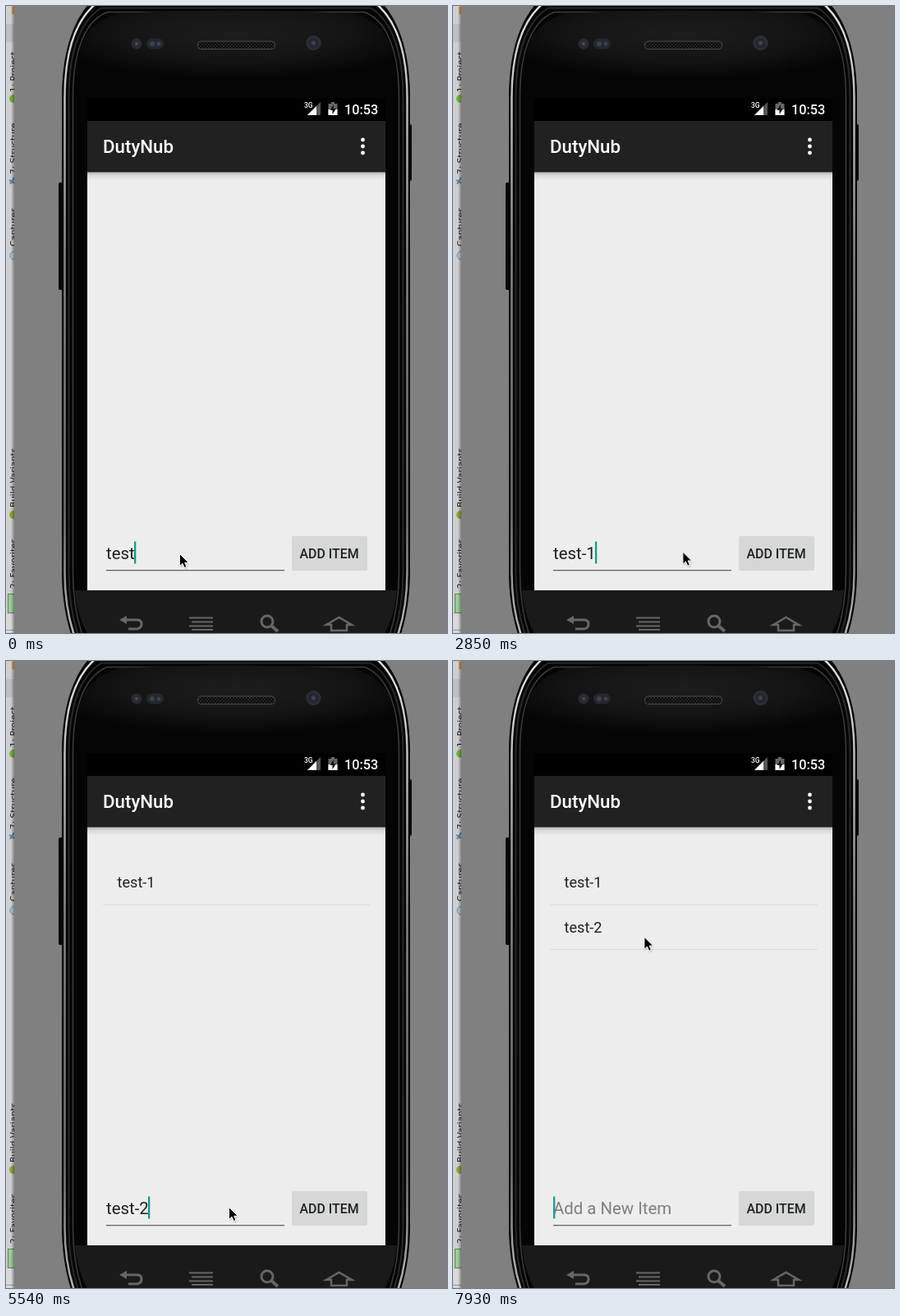
Animation of 537x764 px, one loop 8000 ms. Source, as an HTML page:

```html
<!DOCTYPE html>
<html lang="en">
<head>
<meta charset="utf-8">
<title>Todo list demo</title>
<style>
  html, body { margin: 0; width: 100%; height: 100%; overflow: hidden; background: #808080; }
  svg { display: block; width: 537px; height: 764px; font-family: Roboto, sans-serif; }
  .medium { font-weight: 500; }
  .panel { font: 10.5px "DejaVu Sans", sans-serif; fill: #222; }
</style>
</head>
<body>
<svg viewBox="0 0 537 764">
  <defs>
    <linearGradient id="rim" x1="0" y1="0" x2="0" y2="1">
      <stop offset="0" stop-color="#e2e4e2"/><stop offset=".12" stop-color="#c4c6c4"/>
      <stop offset=".4" stop-color="#858785"/><stop offset=".8" stop-color="#6f716f"/>
      <stop offset="1" stop-color="#b4b6b4"/>
    </linearGradient>
    <radialGradient id="gloss" cx=".5" cy=".3" r=".6">
      <stop offset="0" stop-color="#1d1d1d"/><stop offset=".6" stop-color="#141414"/><stop offset="1" stop-color="#050505"/>
    </radialGradient>
    <linearGradient id="barShadow" x1="0" y1="0" x2="0" y2="1">
      <stop offset="0" stop-opacity=".25"/><stop offset=".4" stop-opacity=".08"/><stop offset="1" stop-opacity="0"/>
    </linearGradient>
    <linearGradient id="edge"><stop offset="0" stop-opacity="0"/><stop offset="1" stop-opacity=".35"/></linearGradient>
    <radialGradient id="lens"><stop offset="0" stop-color="#4b5264"/><stop offset=".45" stop-color="#20232c"/><stop offset="1" stop-color="#30333c"/></radialGradient>
    <pattern id="mesh" width="4" height="4" patternUnits="userSpaceOnUse">
      <rect width="4" height="4" fill="#0a0a0a"/><circle cx="1" cy="1" r=".8" fill="#444"/><circle cx="3" cy="3" r=".8" fill="#444"/>
    </pattern>
    <clipPath id="sideClip"><rect width="10" height="764"/></clipPath>
    <clipPath id="buttonClip"><rect x="348" y="646" width="92" height="42" rx="2"/></clipPath>
    <filter id="soft" x="-20%" y="-20%" width="140%" height="150%"><feGaussianBlur stdDeviation="1.3"/></filter>
  </defs>

  <rect width="537" height="764" fill="#808080"/>

  <!-- Tool window strip -->
  <g clip-path="url(#sideClip)">
    <rect width="10" height="764" fill="#cfcfcf"/>
    <rect y="22" width="10" height="22" fill="#c0c0c0"/>
    <rect x="7" y="1" width="3" height="9" fill="#d99a4e"/>
    <g class="panel">
      <text transform="translate(13 105) rotate(-90)">1: Project</text>
      <text transform="translate(13 205) rotate(-90)">7: Structure</text>
      <text transform="translate(13 293) rotate(-90)">Captures</text>
      <text transform="translate(13 611) rotate(-90)">Build Variants</text>
      <text transform="translate(13 710) rotate(-90)">2: Favorites</text>
    </g>
    <circle cx="9" cy="113" r="5" fill="#70b53c"/>
    <path d="M4 212l6 4M5 217l5-8" stroke="#5685ad" stroke-width="2"/>
    <circle cx="10" cy="304" r="5" fill="#b5cad8" stroke="#678ba5"/>
    <circle cx="9" cy="620" r="5" fill="#87aa37"/>
    <rect x="2.500" y="716.500" width="12" height="23" fill="#9ccb98" stroke="#687d66"/>
    <rect y="741" width="10" height="23" fill="#d8d8d8"/>
    <path d="M0 760.500H10" stroke="#999"/>
    <rect x="6" width="4" height="764" fill="url(#edge)"/>
  </g>

  <!-- Phone -->
  <rect x="64" y="215" width="7" height="131" rx="2" fill="#080808"/>
  <rect x="489" y="144" width="5" height="69" rx="2" fill="#080808"/>
  <path id="body" fill="#050505"/>
  <g fill="none">
    <path id="rimLine" stroke="url(#rim)" stroke-width="2.500"/>
    <path id="grooveLine" stroke="#292929" stroke-width="2"/>
    <path id="bezelLine" stroke="#3c3c3c" stroke-width="1.500"/>
  </g>
  <path d="M84 83C87 42 102 20 136 9Q280 2 424 9C458 20 473 42 476 83Q390 97 280 98Q170 97 84 83Z" fill="url(#gloss)"/>
  <path d="M84 712H476C474 736 467 755 457 772H103C93 755 86 736 84 712Z" fill="#1a1a1a"/>
  <rect x="233.500" y="43" width="94" height="9.500" rx="4" fill="url(#mesh)" stroke="#4a4a4a"/>
  <circle cx="374.500" cy="45" r="9" fill="url(#lens)"/>
  <circle cx="159" cy="46" r="6.500" fill="#292b32"/><circle cx="159" cy="46" r="2" fill="#454955"/>
  <rect x="171" y="39.500" width="21" height="13" rx="6.500" fill="#25272e"/>
  <circle cx="178" cy="46" r="3" fill="#3c404e"/><circle cx="186" cy="46" r="2.500" fill="#3c404e"/>

  <g fill="none" stroke="#666" stroke-width="3">
    <path d="M144 748H160Q165 748 165 753T160 759H149"/>
    <path d="M138 748L147 743V753Z" fill="#666" stroke="none"/>
    <path d="M223 745.500H252M226 750.500H252M223 755.500H252M226 760H252" stroke-width="2"/>
    <circle cx="318" cy="750" r="7"/><path d="M323 755L331 762" stroke-width="4"/>
    <path d="M390 754L405.500 745L421 754H415V761H396V754Z" stroke-width="2.500"/>
  </g>

  <!-- Screen -->
  <rect x="99" y="112" width="363" height="600"/>
  <g fill="#fff">
    <text class="medium" x="363" y="124" font-size="8.500">3G</text>
    <path d="M383 117V133H367Z" fill="#555"/><path d="M378 122V133H367Z"/>
    <path d="M396 117H400V119H403.500V133H392.500V119H396Z" fill="#666"/>
    <path d="M392.500 126H403.500V133H392.500Z"/>
    <path d="M399 120L394.500 127H397.500V132L402 125H399Z" fill="#111"/>
    <text class="medium" x="412" y="131.500" font-size="16.300">10:53</text>
  </g>
  <rect x="99" y="202" width="363" height="510" fill="#ededed"/>
  <rect x="99" y="202" width="363" height="11" fill="url(#barShadow)"/>
  <rect x="99" y="140" width="363" height="62.500" fill="#212121"/>
  <text class="medium" x="118" y="179" font-size="22.300" fill="#fff">DutyNub</text>
  <path d="M434.500 163V179.500" stroke="#fff" stroke-width="4.800" stroke-linecap="round" stroke-dasharray="0 8"/>

  <g font-size="18.150" fill="#212121">
    <g id="item1"><text x="135.500" y="276">test-1</text><path d="M118 297H444" stroke="#dadada" stroke-width="1.200"/></g>
    <g id="item2"><text x="135.500" y="331">test-2</text><path d="M118 351.500H444" stroke="#dadada" stroke-width="1.200"/></g>
  </g>

  <g font-size="20.400">
    <text id="hint" x="122" y="674" fill="#7f7f7f">Add a New Item</text>
    <text id="entry" x="122" y="674" fill="#212121"></text>
  </g>
  <path d="M122 687.700H339" stroke="#606060" stroke-width="1.200"/>
  <rect id="caret" y="652.500" width="2.300" height="27" fill="#159c8f"/>

  <rect id="lift" x="348" y="648" width="92" height="42" rx="2" filter="url(#soft)"/>
  <rect x="348" y="646" width="92" height="42" rx="2" fill="#d6d7d7"/>
  <g clip-path="url(#buttonClip)">
    <rect id="tint" x="348" y="646" width="92" height="42"/>
    <circle id="ripple" cx="401" cy="665"/>
  </g>
  <text class="medium" x="357.500" y="673" font-size="15.900" fill="#212121">ADD ITEM</text>

  <g id="pointer">
    <path d="M1 2V17L4.500 13.500L7 19L10 18L7.500 12.500H12Z" opacity=".25" filter="url(#soft)"/>
    <path d="M.5 .5V15.500L4 12.300L6.300 17.500L9 16.300L6.700 11.300H11.300Z" stroke="#fff"/>
  </g>
</svg>
<script>
const LOOP = 8000;
const TICK = 149.5; // the screen refreshes in these steps
const FIRST_ADD = 20, SECOND_ADD = 44; // ticks at which items appear

const $ = id => document.getElementById(id);
const set = (id, attributes) => {
  for (const name in attributes) $(id).setAttribute(name, attributes[name]);
};
const clamp = (value, low, high) => Math.min(high, Math.max(low, value));
const easeOut = p => 1 - (1 - clamp(p, 0, 1)) ** 4;

// Phone contour, inset by d and mirrored about x = 280.
function contour(d) {
  const right = x => 560 - x, side = 68 + d, foot = 80 + d, top = 104 + 1.4 * d;
  return `M${foot} 768C${72 + d} 745 ${side} 716 ${side} 690V112
    C${side} 62 ${79 + d} 20 ${top} ${d - 6}H${right(top)}
    C${right(79 + d)} 20 ${right(side)} 62 ${right(side)} 112V690
    C${right(side)} 716 ${right(72 + d)} 745 ${right(foot)} 768`;
}
set('body', { d: contour(0) });
set('rimLine', { d: contour(3.5) });
set('grooveLine', { d: contour(8.5) });
set('bezelLine', { d: contour(13.5) });

function typedText(n) {
  if (n < FIRST_ADD) return 'test-1'.slice(0, clamp(n - 2, 4, 6));
  if (n < 30 || n >= SECOND_ADD) return '';
  return n < 37 ? 'test'.slice(0, clamp(n - 29, 2, 4)) : 'test-2';
}

// The caret blinks every four ticks, starting over whenever the text changes.
function caretVisible(n) {
  let edited = n;
  while (edited > 0 && typedText(edited - 1) === typedText(n)) edited--;
  return Math.floor((n - edited) / 4) % 2 === 0;
}

const field = { x: 271, y: 665 }, button = { x: 405, y: 660 };
const moves = [
  { from: 8, to: 13, target: button, bow: 20 },
  { from: 18, to: 20, target: field, bow: 0 },
  { from: 37, to: 41, target: button, bow: 0 },
  { from: 46, to: 55, target: { x: 232, y: 335 }, bow: 0 },
];
function pointerAt(n) {
  let x = 211, y = 667;
  for (const { from, to, target, bow } of moves) {
    const p = easeOut((n - from) / (to - from));
    x += (target.x - x) * p;
    y += (target.y - y) * p - bow * Math.sin(Math.PI * p);
  }
  return `translate(${x} ${y})`;
}

function draw(t) {
  const n = Math.floor(t / TICK);
  const text = typedText(n);
  $('entry').textContent = text;
  const caretX = Math.round(121.5 + $('entry').getComputedTextLength());
  set('hint', { opacity: text ? 0 : 1 });
  set('caret', { x: caretX, opacity: +caretVisible(n) });
  set('item1', { opacity: +(n >= FIRST_ADD) });
  set('item2', { opacity: +(n >= SECOND_ADD) });

  const age = n - (n < SECOND_ADD ? FIRST_ADD : SECOND_ADD);
  const press = age < 0 ? 0 : clamp(1 - age / 3, 0, 1);
  set('tint', { opacity: 0.14 * press });
  set('ripple', { opacity: 0.12 * press, r: Math.max(0, 23 + 18 * age) });
  set('lift', { opacity: 0.35 * press });
  set('pointer', { transform: pointerAt(n) });
}

const start = performance.now();
function tick() {
  draw((performance.now() - start) % LOOP);
  requestAnimationFrame(tick);
}
tick();
</script>
</body>
</html>
```
